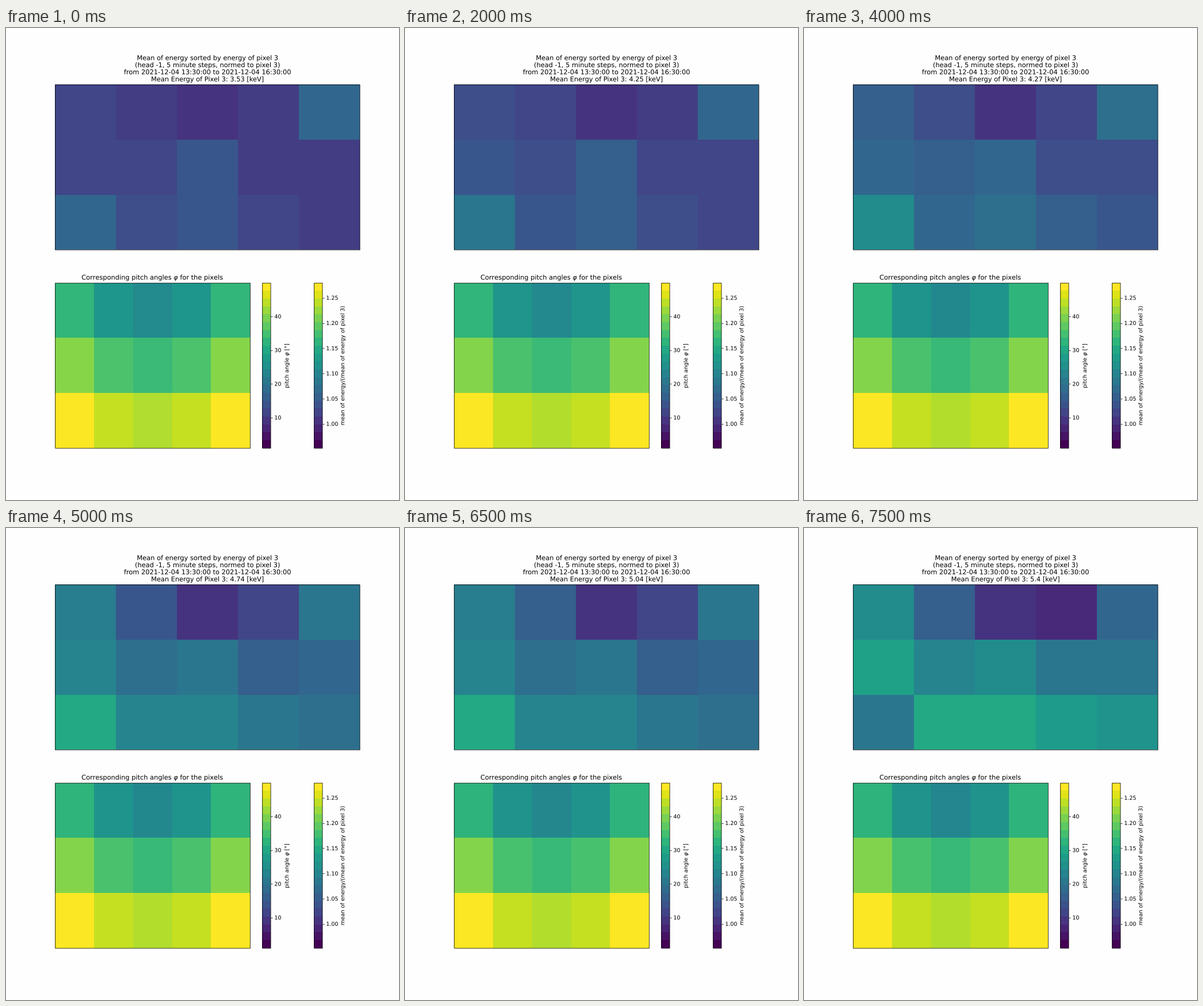
Animation of 683 by 820 pixels, one loop 8 s. Source, as a matplotlib script:

```python
import numpy as np
import matplotlib.pyplot as plt
from matplotlib.animation import FuncAnimation
from matplotlib.cm import ScalarMappable
from matplotlib.colors import Normalize
from matplotlib.patches import Rectangle
from matplotlib.patheffects import Normal
from matplotlib.text import Text
from matplotlib.transforms import Affine2D

W, H, DPI = 683, 820, 68.3
STEPS, INTERVAL = 16, 500

plt.rcParams["font.family"] = "DejaVu Sans"
plt.rcParams["text.hinting"] = "none"

ROW, COL = np.mgrid[0:3, 0:5]

# Energy ratio at the start, in percent above pixel 3
START = np.array([[2, 1, 0, 1, 6], [2, 2, 4, 1, 1], [6, 3, 4, 2, 1]])
# Growth rises with the distance from pixel 3, faster to the left
SIDE = 4.3 * np.maximum(2 - COL, 0) + 1.3 * np.maximum(COL - 2, 0)
GROWTH = np.hypot(SIDE, 5 * ROW ** 0.55)
# Late shift: lower rows gain, the two outer corners fall back
LATE = 1.6 * ROW - 3 * (ROW == 0) * (COL > 2) - 12 * (ROW == 2) * (COL == 0)

KNOTS = [0, 2, 4, 5, 6, 8, 11, 13, 15]
ENERGY = [3.53, 3.58, 4.25, 4.25, 4.27, 4.27, 4.97, 5.04, 5.4]
AMOUNT = [0, -0.2, 0.17, 0.3, 0.4, 0.4, 1, 0.82, 1]


def ratios(k):
    late = max(0, (k - 13) / 2)
    percent = START + np.interp(k, KNOTS, AMOUNT) * GROWTH + late * LATE
    return 1 + np.round(percent) / 100


def pitch(k):
    t = k / (STEPS - 1)
    centre = 24.2 - 0.7 * t + (10 + 0.4 * t) * ROW
    return np.hypot(centre, 11.3 * (COL - 2))


def title(k):
    energy = round(float(np.interp(k, KNOTS, ENERGY)), 2)
    return ("Mean of energy sorted by energy of pixel 3\n"
            "(head -1, 5 minute steps, normed to pixel 3)\n"
            "from 2021-12-04 13:30:00 to 2021-12-04 16:30:00\n"
            f"Mean Energy of Pixel 3: {energy} [keV]")


fig = plt.figure(figsize=((W + 0.01) / DPI, (H + 0.01) / DPI), dpi=DPI,
                 facecolor="#fefefe")


def panel(x, y, w, h):
    return fig.add_axes([x / W, 1 - (y + h) / H, w / W, h / H])


def outline(ax):
    """Soft, unsnapped border around the axes."""
    shift = Affine2D().translate(0.34, -0.34)
    ax.add_patch(Rectangle((0, 0), 1, 1, transform=ax.transAxes + shift,
                           fill=False, lw=0.8, clip_on=False, snap=False,
                           zorder=5))


def heatmap(ax, grid, norm):
    mesh = ax.pcolormesh(grid, cmap="viridis", norm=norm, antialiased=False)
    ax.invert_yaxis()
    ax.set_xticks([])
    ax.set_yticks([])
    ax.spines[:].set_visible(False)
    outline(ax)
    return mesh


def colorbar(x, norm, ticks, label, fmt):
    bands = plt.get_cmap("viridis").resampled(21)
    bar = fig.colorbar(ScalarMappable(norm, bands), format=fmt, ticks=ticks,
                       cax=panel(x, 442.8, 14.35, 287))
    bar.set_label(label)
    bar.outline.set_visible(False)
    outline(bar.ax)


ratio_norm = Normalize(0.952, 1.2796)
pitch_norm = Normalize(0.95, 49.95)

ax_top = panel(85.4, 98.4, 529.3, 287)
ax_low = panel(85.4, 442.8, 338.8, 287)
top_map = heatmap(ax_top, ratios(0), ratio_norm)
low_map = heatmap(ax_low, pitch(0), pitch_norm)
head = ax_top.set_title(title(0))
ax_low.set_title(r"Corresponding pitch angles $\varphi$ for the pixels")

colorbar(445.4, pitch_norm, np.arange(10, 41, 10),
         r"pitch angle $\varphi$ [°]", "{x:.0f}")
colorbar(535.3, ratio_norm, np.arange(1, 1.26, 0.05),
         "mean of energy/(mean of energy of pixel 3)", "{x:.2f}")

# Draw text as outlines so that it keeps its sub-pixel position
fig.draw_without_rendering()
for text in fig.findobj(Text):
    text.set_path_effects([Normal()])


def update(k):
    top_map.set_array(ratios(k))
    low_map.set_array(pitch(k))
    head.set_text(title(k))
    return top_map, low_map, head


anim = FuncAnimation(fig, update, frames=STEPS, interval=INTERVAL,
                     init_func=lambda: update(0), repeat=True, repeat_delay=0)
plt.show()
```
